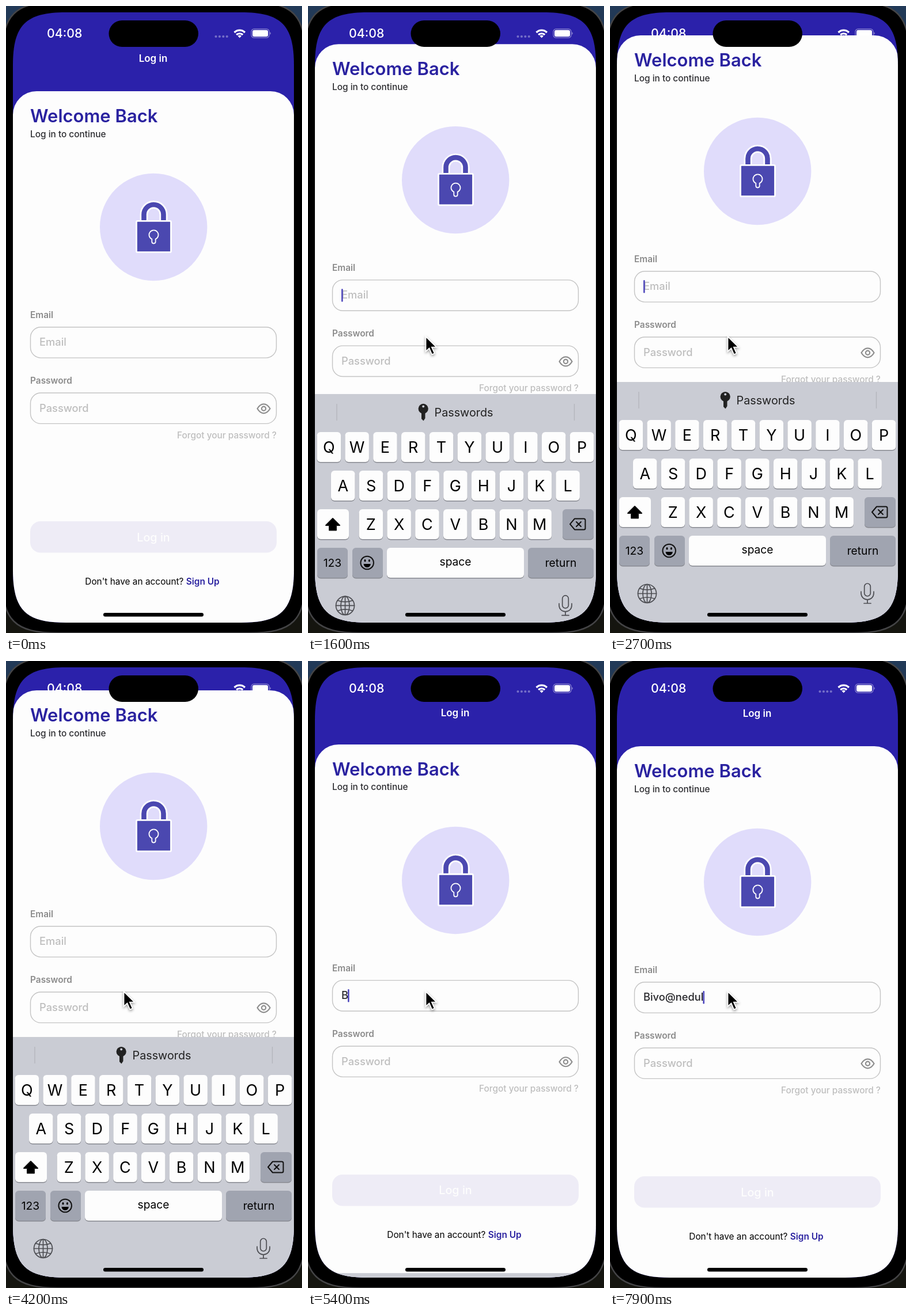
An HTML page for the animation above (8000 ms loop, 514x1089 px).

```html
<!DOCTYPE html>
<html lang="en">
<head>
<meta charset="utf-8">
<title>Log in</title>
<style>
  html, body { margin: 0; height: 100%; overflow: hidden; background: #000; }
  svg { display: block; width: 100vw; height: 100vh; font: 500 15.4px Inter, sans-serif; }
  .mid { text-anchor: middle; }
  .label { font-weight: 600; fill: #8b8b8b; }
  .input { font-size: 18.3px; }
  .field { fill: none; stroke: #c4c4c4; stroke-width: 1.4; }
  .faint { fill: #bebebe; }
  .brand { font-weight: 600; fill: #2a22a0; }
  .line { fill: none; stroke: #111; stroke-width: 2; stroke-linecap: round; stroke-linejoin: round; }
  #board text { font-weight: 400; font-size: 19.2px; }
  #board .letter { font-size: 27px; }
  #board .lower { font-size: 29px; }
</style>
</head>
<body>
<svg viewBox="0 0 514 1089">
  <defs>
    <linearGradient id="desk" x2="0" y2="1">
      <stop stop-color="#223a58"/><stop offset=".5" stop-color="#0e1620"/><stop offset="1" stop-color="#15150f"/>
    </linearGradient>
    <clipPath id="screen"><path id="glass"/></clipPath>
  </defs>
  <rect width="514" height="1089" fill="url(#desk)"/>
  <path id="body" stroke="#444446" stroke-width="2.5"/>

  <g clip-path="url(#screen)">
    <rect width="514" height="1089" fill="#2b21aa"/>
    <g fill="#fff">
      <text id="header" class="mid" x="255.5" y="97" font-size="17" font-weight="600">Log in</text>
      <text x="71" y="55.3" font-size="21.3">04:08</text>
      <path d="M364.5 53h.01m6.4 0h.01m6.4 0h.01m6.4 0h.01" stroke="#fff" stroke-opacity=".35" stroke-width="4.2" stroke-linecap="round"/>
      <path d="M396.5 46a13 13 0 0 1 18.4 0M400.2 50a7.8 7.8 0 0 1 11 0" fill="none" stroke="#fff" stroke-width="3.2"/>
      <path d="M405.7 55.5l-3.2-3.4a4.6 4.6 0 0 1 6.4 0z"/>
      <rect x="426" y="39.8" width="31" height="15.4" rx="4.8" fill="none" stroke="#fff" stroke-opacity=".45" stroke-width="1.2"/>
      <rect x="428" y="41.8" width="27" height="11.4" rx="3"/>
      <path d="M458.3 45q3 2.5 0 5z" opacity=".5"/>
    </g>

    <g id="sheet">
      <rect x="12" y="148" width="488" height="1100" rx="41" fill="#fdfdfd"/>
      <text class="brand" x="42" y="202" font-size="31">Welcome Back</text>
      <text x="42" y="227.5" fill="#2c2c30">Log in to continue</text>

      <circle cx="256.2" cy="384" r="93.2" fill="#e0dcfb"/>
      <g fill="none">
        <path d="M239.5 374v-12a17 17 0 0 1 34 0v12" stroke="#fff" stroke-width="14"/>
        <path d="M239.5 374v-12a17 17 0 0 1 34 0v12" stroke="#4b48b0" stroke-width="8.6"/>
        <rect x="226.5" y="373.3" width="60" height="54.4" rx="2" fill="#4b48b0" stroke="#fff" stroke-width="2.8"/>
        <path d="M253.3 404.8a8 8 0 1 1 6.4 0v4.5a3.2 3.2 0 0 1-6.4 0z" stroke="#fff" stroke-width="1.8"/>
      </g>

      <text class="label" x="42" y="542">Email</text>
      <rect class="field" x="42.5" y="557.7" width="427" height="53.4" rx="18"/>
      <text id="hint" class="input faint" x="58" y="590.3">Email</text>
      <text id="typed" class="input" x="58" y="590.3" fill="#28282c"></text>
      <rect id="caret" y="573" width="2.6" height="22.5" rx="1.2" fill="#4f48bd"/>

      <text class="label" x="42" y="656.3">Password</text>
      <rect class="field" x="42.5" y="672" width="427" height="53.4" rx="18"/>
      <text class="input faint" x="58" y="704.7">Password</text>
      <g fill="none" stroke="#8e8e8e" stroke-width="2.2">
        <path d="M436.5 699.3q4.5-8 11-8t11 8q-4.5 8-11 8t-11-8z"/><circle cx="447.5" cy="699.3" r="3.6"/>
      </g>
      <text class="faint" x="470" y="751" text-anchor="end">Forgot your password ?</text>

      <rect x="42" y="895" width="428" height="54.6" rx="18" fill="#eeecf6"/>
      <text class="mid" x="256" y="929.5" font-size="19.8" fill="#fdfdfd">Log in</text>
      <text class="mid" x="254" y="1004.7" font-weight="400">Don't have an account? <tspan class="brand">Sign Up</tspan></text>
    </g>

    <g id="board">
      <rect x="12" width="488" height="440" fill="#caccd4"/>
      <g id="bar">
        <path d="M50 17v29M462.5 17v29" stroke="#b3b5bc" stroke-width="1.3"/>
        <path d="M197 32h6.5v10l-3 4.5-3.5-3.5z" fill="#222"/>
        <circle cx="200.2" cy="25.5" r="8.6" fill="#222"/><circle cx="200.2" cy="21.5" r="2" fill="#caccd4"/>
        <text x="219.5" y="39.3" fill="#222" style="font-size:19.8px">Passwords</text>
      </g>
      <g id="keys"></g>
      <path id="arrow" class="line" d="M43 216l12 12h-6v8.5h-12v-8.5h-6z"/>
      <path class="line" d="M463 216.5h16q2.5 0 2.5 2.5v14q0 2.5-2.5 2.5h-16l-8-9.5zM466 222l8 8m0-8l-8 8"/>
      <circle class="line" cx="102.7" cy="293" r="11.3"/>
      <path d="M96.5 295h12.4q-1 6-6.2 6t-6.2-6z"/>
      <ellipse cx="99" cy="289.3" rx="1.4" ry="2.2"/><ellipse cx="106.4" cy="289.3" rx="1.4" ry="2.2"/>
      <g class="line" style="stroke:#4c4d52;stroke-width:1.7">
        <circle cx="64.5" cy="367.5" r="16"/><ellipse cx="64.5" cy="367.5" rx="7.5" ry="16"/>
        <path d="M48.5 367.5h32M64.5 351.5v32M51.5 358.5q13 5 26 0M51.5 376.5q13-5 26 0"/>
        <rect x="441.7" y="350" width="10.6" height="22" rx="5.3"/>
        <path d="M436 364v3a11 11 0 0 0 22 0v-3M447 378v6.5M441 384.5h12"/>
      </g>
    </g>
    <rect x="169" y="1054" width="174" height="6.6" rx="3.3"/>
  </g>
  <rect x="178.5" y="25" width="155.5" height="46" rx="23"/>

  <path id="pointer" d="M0 0v26l6-5.5 4.7 10.8 4.6-2-4.8-10.6h8.2z" stroke="#fff" stroke-width="1.8"
        style="filter:drop-shadow(0 2px 2px #0006)"/>
</svg>
<script>
const LOOP = 8000, STEP = 100, ADDRESS = "Bivo@nedul", FOCUS = 1326, FIRST_KEY = 5000;
const el = Object.fromEntries([...document.querySelectorAll("[id]")].map(e => [e.id, e]));

// Rectangle with continuous corners: reach is where a corner starts, pull places its handles
const squircle = (x, y, w, h, reach, pull) => {
  const r = x + w, b = y + h;
  return `M${x + reach} ${y}H${r - reach}C${r - pull} ${y} ${r} ${y + pull} ${r} ${y + reach}
    V${b - reach}C${r} ${b - pull} ${r - pull} ${b} ${r - reach} ${b}
    H${x + reach}C${x + pull} ${b} ${x} ${b - pull} ${x} ${b - reach}
    V${y + reach}C${x} ${y + pull} ${x + pull} ${y} ${x + reach} ${y}Z`;
};
el.glass.setAttribute("d", squircle(12, 11, 488, 1060, 92, 22));
el.body.setAttribute("d", squircle(-7, -7, 527, 1096, 98, 22));

// Keyboard layout
const GREY = "#a0a4b0";
const key = (x, y, w, label, fill = "#fdfdfd", base = 33, cls = "") =>
  `<rect x="${x}" y="${y + 1.6}" width="${w}" height="52" rx="6" fill="#888a91"/>
   <rect x="${x}" y="${y}" width="${w}" height="52" rx="6" fill="${fill}"/>
   <text class="mid ${cls}" x="${x + w / 2}" y="${y + base}">${label}</text>`;
let keys = "";
[["QWERTYUIOP", 15.6], ["ASDFGHJKL", 40], ["ZXCVBNM", 88.6]].forEach(([row, left], r) =>
  [...row].forEach((c, i) => keys += key(left + i * 48.8, 66 + r * 67, 41.5, c, "#fdfdfd", 36, "letter")));
keys += `<g id="shift">${key(16, 200, 55, "")}</g>` + key(442, 200, 54, "", GREY)
  + key(16, 267, 53, "123", GREY) + key(77, 267, 53, "", GREY)
  + key(137, 267, 238, "space", "#fdfdfd", 31) + key(382, 267, 114, "return", GREY);
el.keys.innerHTML = keys;
const letters = [...document.querySelectorAll(".letter")].map(node => ({ node, c: node.textContent, y: +node.getAttribute("y") }));
const shiftFace = document.querySelectorAll("#shift rect")[1];

const clamp = v => Math.max(0, Math.min(1, v));
// Critically damped spring from 0 to 1
const spring = (t, start, rate) => {
  const x = Math.max(0, t - start) / 1000 * rate;
  return 1 - (1 + x) * Math.exp(-x);
};
const move = (e, x, y) => e.setAttribute("transform", `translate(${x} ${y})`);

let lower = null;
function setCase(isLower) {
  if (isLower === lower) return;
  lower = isLower;
  for (const { node, c, y } of letters) {
    node.textContent = isLower ? c.toLowerCase() : c;
    node.classList.toggle("lower", isLower);
    node.setAttribute("y", isLower ? y - 2 : y);
  }
  shiftFace.setAttribute("fill", isLower ? GREY : "#fdfdfd");
  el.arrow.style.fill = isLower ? "none" : "#000";
}

function draw(t) {
  move(el.header, 0, -97 * (spring(t, 1212, 17.3) - spring(t, 5010, 17)));
  move(el.sheet, 0, -97 * (spring(t, 1380, 15.1) - spring(t, 5088, 17)));
  move(el.board, 0, 1071 - 418 * (spring(t, FOCUS, 17.3) - spring(t, 5042, 16.5)));
  el.bar.style.opacity = clamp((t - 1380) / 170);
  setCase(t >= FIRST_KEY);

  const count = t < FIRST_KEY ? 0 : 1 + Math.max(0, Math.floor((t - 5360) / 240));
  el.typed.textContent = ADDRESS.slice(0, count);
  el.hint.style.display = count ? "none" : "";
  el.caret.setAttribute("x", count ? 57 + el.typed.getComputedTextLength() : 58);
  const phase = (t - FOCUS) % 1000;
  el.caret.style.opacity = t < FOCUS ? 0 : count ? 1 : clamp((650 - phase) / 150) + clamp((phase - 900) / 100);

  const glide = 1 - (1 - clamp((t - 1000) / 250)) ** 3;
  move(el.pointer, 520 - 315.5 * glide, 640 - 66 * glide);
}

(function frame() {
  draw(Math.floor((performance.now() + 5) / STEP) * STEP % LOOP);
  requestAnimationFrame(frame);
})();
</script>
</body>
</html>
```
